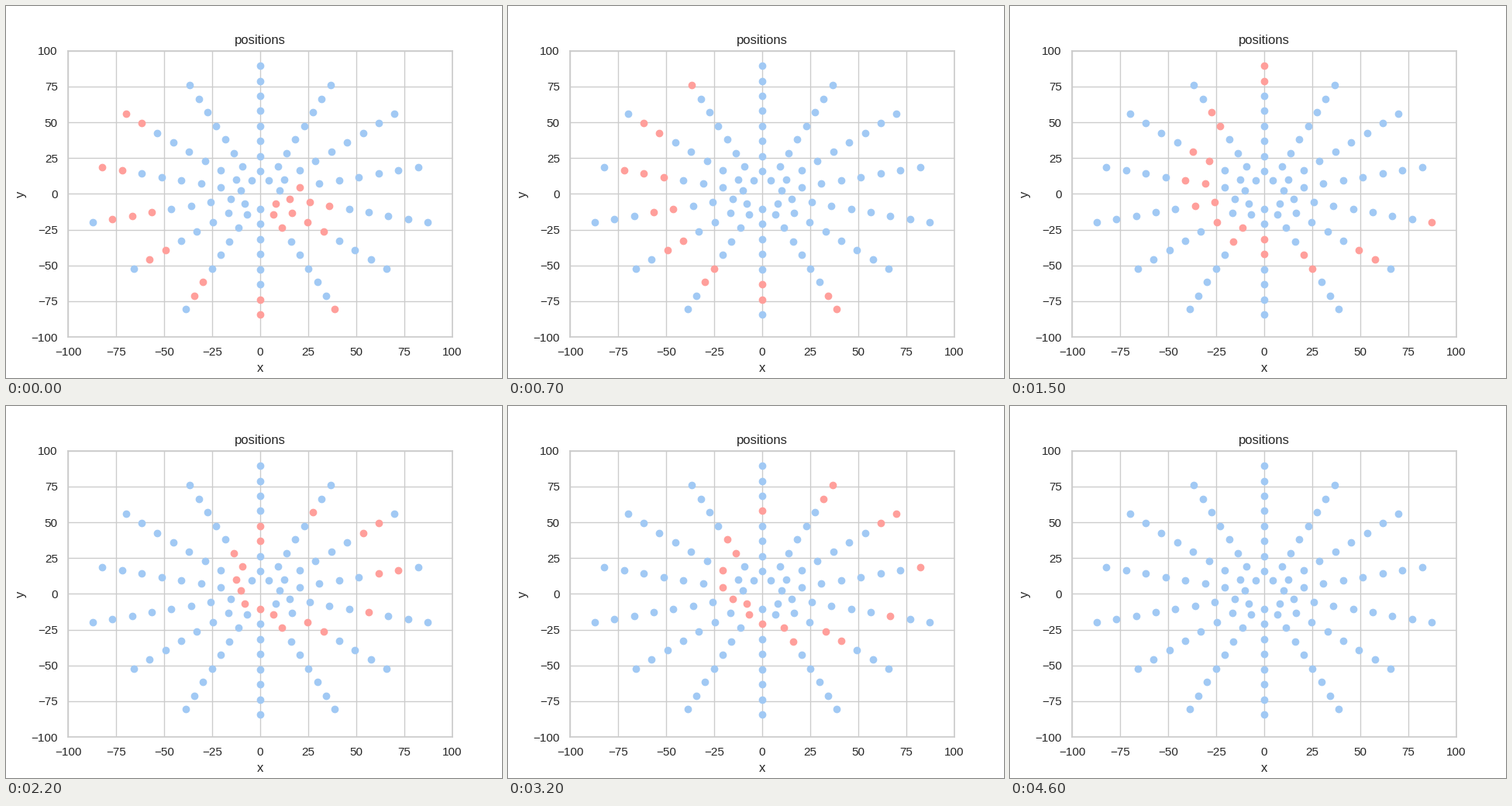
Write a matplotlib script that moves like this. It is 640x480 px and loops after 4700 ms.

```python
import matplotlib.pyplot as plt
import numpy as np
from matplotlib.animation import FuncAnimation

STEP_MS = 100
STEPS = 47
CYCLE = 9
ARMS, RINGS = 14, 8
IDLE, LIT = "#a1c9f4", "#ff9f9b"

SOURCE = (22, 10)
DROP = (22, -14)
DROP_RADIUS = 20
LEAD = 0.25  # how far the ripple runs ahead towards the upper right

plt.rcParams.update({
    "font.family": "Liberation Sans",
    "text.color": ".15",
    "axes.labelcolor": ".15",
    "xtick.color": ".15",
    "ytick.color": ".15",
    "axes.edgecolor": ".8",
    "axes.linewidth": 1.25,
    "axes.axisbelow": True,
    "axes.labelsize": 12,
    "axes.titlesize": 12,
    "xtick.labelsize": 11,
    "ytick.labelsize": 11,
    "grid.color": ".8",
    "grid.linewidth": 1,
})


def dot_positions():
    arm, ring = np.divmod(np.arange(ARMS * RINGS), RINGS)
    radius = 100 * (2 * ring + 2 + (arm % 2 == 0)) / 19
    angle = 2 * np.pi * arm / ARMS
    return radius * np.sin(angle), radius * np.cos(angle)


x, y = dot_positions()
dx, dy = x - SOURCE[0], y - SOURCE[1]
reach = np.hypot(dx, dy) - LEAD * (dx + dy) / np.sqrt(2)
in_drop = np.hypot(x - DROP[0], y - DROP[1]) < DROP_RADIUS


def lit_dots(step):
    """Ripple band at this step; a new drop lands as the old ripple leaves."""
    phase = (step - 1) % CYCLE + 1
    front = np.interp(phase, [1, 3, 5, 6, 7, 9], [0, 28, 48, 66, 98, 112])
    lit = np.abs(reach - front) < 2.5 + 0.1 * front
    return lit | in_drop if phase == CYCLE else lit


fig, ax = plt.subplots(figsize=(6.4, 4.8), dpi=100)
ax.set(xlim=(-100, 100), ylim=(-100, 100), xlabel="x", ylabel="y",
       title="positions")
ticks = np.arange(-100, 101, 25)
ax.set_xticks(ticks)
ax.set_yticks(ticks)
ax.grid(True, solid_capstyle="round")
ax.tick_params(length=0, pad=9.5)

idle_dots, lit_marks = (
    ax.plot([], [], "o", color=color, markersize=6, markeredgewidth=1)[0]
    for color in (IDLE, LIT)
)


def update(step):
    lit = lit_dots(step)
    idle_dots.set_data(x[~lit], y[~lit])
    lit_marks.set_data(x[lit], y[lit])
    return idle_dots, lit_marks


anim = FuncAnimation(fig, update, frames=STEPS, interval=STEP_MS,
                     repeat=True, repeat_delay=0)
plt.show()
```
